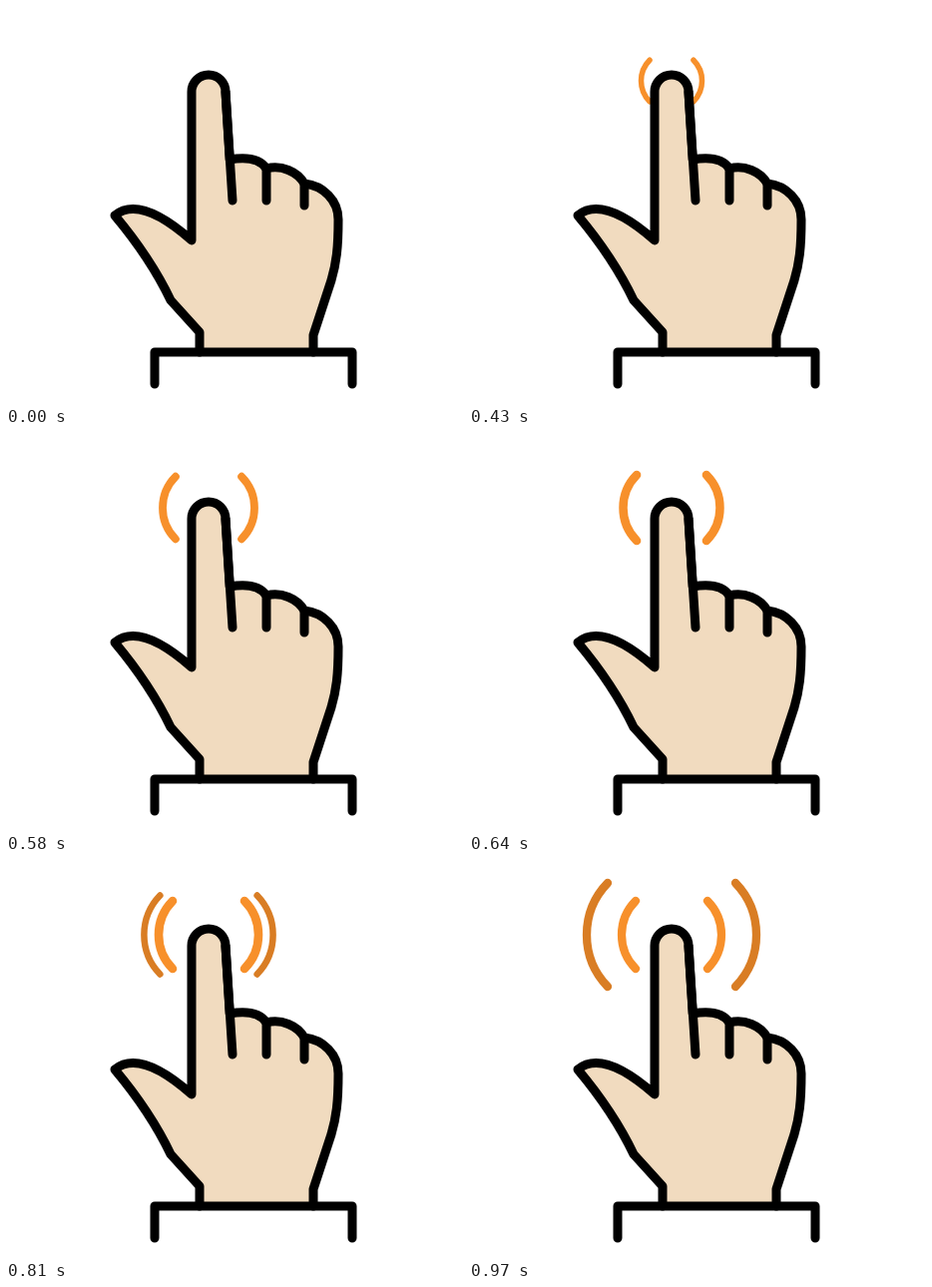
Write an HTML page with a canvas that moves like this. It is 458 px wide and 400 px high and loops after 1.96 s.

```html
<!DOCTYPE html>
<html lang="en">
<head>
<meta charset="utf-8">
<title>Tap gesture</title>
<style>
  html, body { margin: 0; width: 100%; height: 100%; overflow: hidden; background: #fff; }
  canvas { display: block; }
</style>
</head>
<body>
<canvas id="stage" width="458" height="400"></canvas>
<script>
const ctx = document.getElementById('stage').getContext('2d');
const LOOP = 1960;
const TIP = { x: 203, y: 75 };

// Each key holds until the next: [start ms, scale, line width]
const inner = {
  edge: 50, endX: 36, endY: 34, color: '#f7902b', startColor: '#dc8a38',
  keys: [[320, .34, 3], [430, .61, 5.5], [490, .79, 7], [580, .92, 7.8],
         [640, .97, 8.5], [720, 1, 9.2], [810, 1, 8.6], [880, 1, 8.2]]
};
const outer = {
  edge: 85, endX: 64, endY: 52, color: '#d97d24', startColor: '#d18427',
  keys: [[720, .34, 3], [810, .76, 6.5], [880, .965, 8.3], [970, 1, 8.3]]
};

const hand = new Path2D(`M194 347V327L165 295Q145 253 109 210
  C130 193 160 212 186 235V86A17 17 0 0 1 220 86L224.2 154
  C242 151 255 154 261 163C276 159 292 166 299 178
  C318 180 333 195 333 214C333 243 331 258 326 275L308 330V347`);
const creases = new Path2D('M220 86L227 195M261 163V195M299 178V200');
const cuff = new Path2D('M149 379V347H347V379');

function drawWave(wave, t) {
  const key = wave.keys.filter(k => k[0] <= t).pop();
  if (!key) return;
  const [, scale, width] = key;
  const sag = wave.edge - wave.endX;
  const r = (wave.endY ** 2 + sag ** 2) / (2 * sag);
  const half = Math.asin(wave.endY / r);
  ctx.strokeStyle = scale < .5 ? wave.startColor : wave.color;
  for (const side of [-1, 1]) {
    ctx.save();
    ctx.translate(TIP.x, TIP.y);
    ctx.scale(side * scale, scale);
    ctx.lineWidth = width / scale;
    ctx.beginPath();
    ctx.arc(wave.edge - r, 0, r, -half, half);
    ctx.stroke();
    ctx.restore();
  }
}

function draw(t) {
  ctx.fillStyle = '#fff';
  ctx.fillRect(0, 0, 458, 400);
  ctx.lineCap = ctx.lineJoin = 'round';
  drawWave(outer, t);
  drawWave(inner, t);
  ctx.fillStyle = '#f1dbbf';
  ctx.fill(hand);
  ctx.strokeStyle = '#000';
  ctx.lineWidth = 9;
  [hand, creases, cuff].forEach(path => ctx.stroke(path));
}

const start = performance.now();
function tick() {
  draw((performance.now() - start) % LOOP);
  requestAnimationFrame(tick);
}
tick();
</script>
</body>
</html>
```
